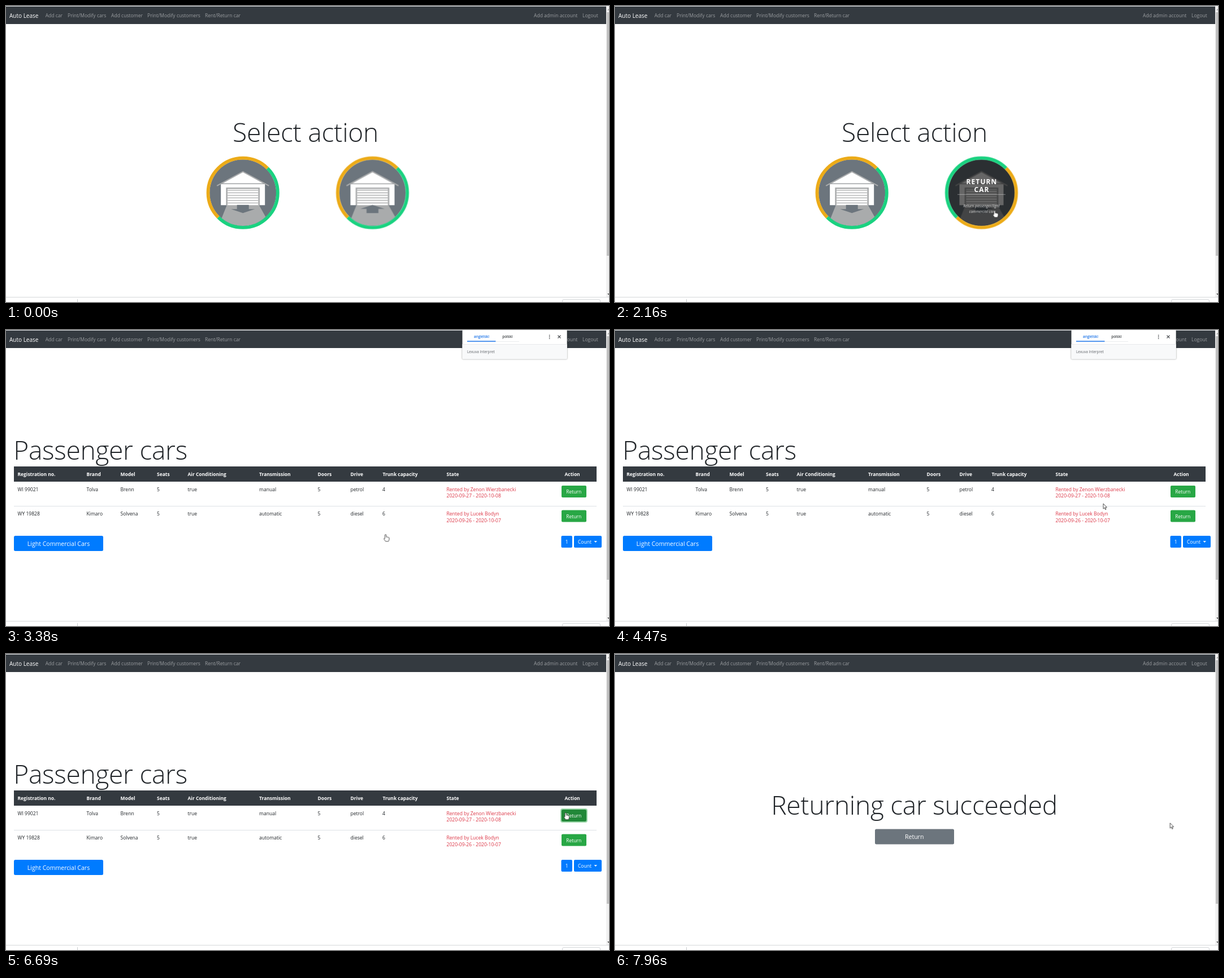
Write an HTML page that moves like this. It is 1067 px wide and 525 px high and loops after 8 s.

```html
<!DOCTYPE html>
<html lang="en">
<head>
<meta charset="utf-8">
<title>Auto Lease</title>
<style>
html, body { margin: 0; width: 100%; height: 100%; overflow: hidden; background: #fff; }
svg { display: block; width: 100%; height: 100%; }
text { font: 8.55px "Open Sans", "Noto Sans", sans-serif; fill: #212529; white-space: pre; }
.nav { fill: #9a9da0; }
.brand { font-size: 10px; fill: #fff; }
.title { font-size: 46.2px; font-weight: 300; letter-spacing: -.35px; }
.mid { text-anchor: middle; }
.head text { font-weight: 700; font-size: 8.45px; fill: #fff; }
.red text { fill: #dc3545; }
.btn text { fill: #fff; text-anchor: middle; }
.btn .big { font-size: 10.55px; }
.over text { text-anchor: middle; fill: #dcdcdc; font-size: 6.5px; font-style: italic; }
.over .cap { fill: #fff; font: 700 12px "Open Sans", "Noto Sans", sans-serif; letter-spacing: 1.1px; }
.url text { font-size: 6.37px; fill: #55585c; }
.popup text { font-size: 6.4px; font-weight: 600; fill: #3c4043; }
.popup .on { fill: #1a73e8; }
.popup .by { font-weight: 400; fill: #5f6368; }
.popup { filter: drop-shadow(0 .5px 1px rgba(0,0,0,.45)); }

.p1, .p2, .p3, .url, .popup, .spin, .over, .hot, .focus, .cursor, .arrow, .hand {
  animation: 8s linear infinite;
}
.p1 { animation-name: p1; animation-timing-function: step-end; }
.p2 { animation-name: p2; animation-timing-function: step-end; }
.p3 { animation-name: p3; animation-timing-function: step-end; }
.arrow { animation-name: arrow; animation-timing-function: step-end; }
.hand { animation-name: hand; animation-timing-function: step-end; }
.url { animation-name: url; }
.popup { animation-name: popup; }
.spin { animation-name: spin; animation-timing-function: ease-in-out; }
.over { animation-name: over; animation-timing-function: ease-in-out; }
.hot { animation-name: hot; }
.focus { animation-name: focus; }
.cursor { animation-name: move; }

@keyframes p1 { 0% { opacity: 1 } 37.5%, 100% { opacity: 0 } }
@keyframes p2 { 0% { opacity: 0 } 37.5% { opacity: 1 } 84.25%, 100% { opacity: 0 } }
@keyframes p3 { 0% { opacity: 0 } 84.25%, 100% { opacity: 1 } }
@keyframes url { 0%, 27% { opacity: 0 } 29.25%, 38.75% { opacity: 1 } 40.6%, 100% { opacity: 0 } }
@keyframes popup { 0%, 40.2% { opacity: 0 } 42.25%, 77.8% { opacity: 1 } 79.75%, 100% { opacity: 0 } }
@keyframes spin { 0%, 16.4% { transform: rotate(0deg) } 26.4%, 100% { transform: rotate(180deg) } }
@keyframes over { 0%, 16.4% { opacity: 0 } 26.4%, 100% { opacity: 1 } }
@keyframes hot { 0%, 64.1% { fill: #28a745 } 66%, 100% { fill: #218838 } }
@keyframes focus { 0%, 77.8% { opacity: 0 } 79.75%, 100% { opacity: 1 } }
@keyframes arrow {
  0% { opacity: 0 } 6.1% { opacity: 1 } 16.6% { opacity: 0 } 47.6% { opacity: 1 }
  64% { opacity: 0 } 90.7%, 100% { opacity: 1 }
}
@keyframes hand {
  0% { opacity: 0 } 16.6% { opacity: 1 } 47.6% { opacity: 0 }
  64% { opacity: 1 } 90.7%, 100% { opacity: 0 }
}
@keyframes move {
  0%, 6% { transform: translate(1043px, 524px) }
  15.875% { transform: translate(718px, 388px); animation-timing-function: ease-out }
  21%, 47.3% { transform: translate(671.6px, 362.4px); animation-timing-function: ease-in }
  50% { transform: translate(694px, 356px) }
  57.1% { transform: translate(899px, 298px) }
  64% { transform: translate(984px, 283px); animation-timing-function: ease-out }
  66.3%, 93.4% { transform: translate(990.2px, 281.2px); animation-timing-function: ease-in-out }
  99.5%, 100% { transform: translate(982.2px, 299.7px) }
}
</style>
</head>
<body>
<svg viewBox="0 0 1067 525" preserveAspectRatio="none">
  <defs>
    <clipPath id="disc"><circle r="58.6"/></clipPath>
    <g id="garage">
      <circle r="59" fill="#6c757d"/>
      <g clip-path="url(#disc)">
        <path d="M-28 21H28L42 46V60H-46L-38 46Z" fill="#a9abac"/>
        <path d="M-39 22V-15L0 -37 39 -15V22Z" fill="#fff"/>
        <path d="M-46 -12.500L0 -37.500 46 -12.500" fill="none" stroke="#a9abac" stroke-width="2"/>
        <path d="M-39 -16H39" stroke="#a0a3a5" stroke-width="1.500"/>
        <path d="M-28.500 22V-8H28.500V22" fill="none" stroke="#a9abac" stroke-width="2.600"/>
        <path d="M-27 -4.500H27M-27 0H27M-27 4.500H27M-27 9H27M-27 13.500H27M-27 18H27" stroke="#a9abac" stroke-width="1.300"/>
      </g>
    </g>
    <g id="ring" fill="none" stroke-width="5.800">
      <path d="M43.600 -43.600A61.650 61.650 0 0 0 -43.600 43.600" stroke="#ecab18"/>
      <path d="M43.600 -43.600A61.650 61.650 0 0 1 -43.600 43.600" stroke="#1ad280"/>
    </g>
  </defs>

  <rect width="1067" height="525" fill="#fff"/>

  <g class="p1">
    <text class="title mid" x="530" y="240.500">Select action</text>
    <g transform="translate(419.200 331.300)">
      <use href="#garage"/>
      <path d="M-10.500 21.500H10.500V29H21L0 36 -21 29H-10.500Z" fill="#6c757d"/>
      <use href="#ring"/>
    </g>
    <g transform="translate(648.500 331.300)">
      <use href="#garage"/>
      <path d="M-10.500 36H10.500V28.500H21.500L0 21.500 -21.500 28.500H-10.500Z" fill="#6c757d"/>
      <g class="over">
        <circle r="59" fill="#000" fill-opacity=".6"/>
        <text class="cap" x=".5" y="-15.500">RETURN</text>
        <text class="cap" x=".5" y="-1">CAR</text>
        <path d="M-42.500 3H42.500" stroke="#fff" stroke-opacity=".5" stroke-width=".8"/>
        <text y="25.300">Return passenger/light</text>
        <text x="1.500" y="35.300">commercial cars</text>
      </g>
      <g class="spin"><use href="#ring"/></g>
    </g>
  </g>

  <g class="p2">
    <text class="title" x="13.300" y="230">Passenger cars</text>
    <rect x="14" y="242" width="1031" height="27" fill="#343a40"/>
    <g class="head">
      <text x="20.500" y="259">Registration no.</text>
      <text x="142.500" y="259">Brand</text>
      <text x="202.500" y="259">Model</text>
      <text x="267" y="259">Seats</text>
      <text x="321.500" y="259">Air Conditioning</text>
      <text x="448" y="259">Transmission</text>
      <text x="551.500" y="259">Doors</text>
      <text x="609.500" y="259">Drive</text>
      <text x="666.500" y="259">Trunk capacity</text>
      <text x="779.500" y="259">State</text>
      <text x="988.500" y="259">Action</text>
    </g>
    <path d="M14 312.500H1045" stroke="#dee2e6"/>
    <g>
      <text x="20.500" y="285.500">WI 99021</text>
      <text x="142.500" y="285.500">Tolva</text>
      <text x="202.500" y="285.500">Brenn</text>
      <text x="267" y="285.500">5</text>
      <text x="321.500" y="285.500">true</text>
      <text x="448" y="285.500">manual</text>
      <text x="551.500" y="285.500">5</text>
      <text x="609.500" y="285.500">petrol</text>
      <text x="666" y="285.500">4</text>
    </g>
    <g>
      <text x="20.500" y="329">WY 19828</text>
      <text x="142.500" y="329">Kimaro</text>
      <text x="202.500" y="329">Solvena</text>
      <text x="267" y="329">5</text>
      <text x="321.500" y="329">true</text>
      <text x="448" y="329">automatic</text>
      <text x="551.500" y="329">5</text>
      <text x="609.500" y="329">diesel</text>
      <text x="666" y="329">6</text>
    </g>
    <g class="red">
      <text x="779.500" y="285.500">Rented by Zenon Wierzbanecki</text>
      <text x="779.500" y="297.300">2020-09-27 - 2020-10-08</text>
      <text x="779.500" y="329">Rented by Lucek Bodyn</text>
      <text x="779.500" y="340.800">2020-09-26 - 2020-10-07</text>
    </g>
    <g class="btn">
      <rect class="focus" x="982" y="275" width="46" height="23" rx="3" fill="none" stroke="#48b461" stroke-opacity=".55" stroke-width="2"/>
      <rect class="hot" x="983" y="276" width="44" height="21" rx="2" fill="#28a745"/>
      <text x="1004.700" y="290">Return</text>
      <rect x="983" y="319.500" width="44" height="21" rx="2" fill="#28a745"/>
      <text x="1004.700" y="333.500">Return</text>
      <g fill="#007bff">
        <rect x="14" y="365" width="158" height="27" rx="2.500"/>
        <rect x="982.500" y="365" width="19.500" height="21" rx="2"/>
        <rect x="1005" y="365" width="49" height="21" rx="2"/>
      </g>
      <text class="big" x="93" y="382.700">Light Commercial Cars</text>
      <text x="992.300" y="379">1</text>
      <text x="1024" y="379">Count</text>
      <path d="M1040.500 374.200H1046L1043.250 377Z" fill="#fff"/>
    </g>
  </g>

  <g class="p3">
    <text class="title mid" x="529.500" y="284.500">Returning car succeeded</text>
    <g class="btn">
      <rect x="460" y="310.500" width="140" height="27" rx="2.500" fill="#6c757d"/>
      <text class="big" x="529.700" y="328.300">Return</text>
    </g>
  </g>

  <g>
    <rect width="1062" height="1" fill="#e3e5e8"/>
    <rect y="1" width="1062" height="31" fill="#343a40"/>
    <text class="brand" x="6" y="20.700">Auto Lease</text>
    <text class="nav" x="69.700" y="20">Add car</text>
    <text class="nav" x="109" y="20">Print/Modify cars</text>
    <text class="nav" x="186" y="20">Add customer</text>
    <text class="nav" x="250" y="20">Print/Modify customers</text>
    <text class="nav" x="352" y="20">Rent/Return car</text>
    <text class="nav" x="934" y="20">Add admin account</text>
    <text class="nav" x="1020" y="20">Logout</text>
  </g>

  <g>
    <rect x="1062" width="5" height="516" fill="#f1f1f1"/>
    <rect x="1063" y="11" width="4" height="432" fill="#c1c1c1"/>
    <path d="M1064 7.500L1066.500 5 1067 5.500V7.500Z" fill="#a3a3a3"/>
    <path d="M1064 510H1067V512L1066.500 512.500Z" fill="#505050"/>
    <rect y="516" width="1067" height="9" fill="#fff"/>
    <path d="M0 516.500H1067" stroke="#d5d7da"/>
    <path d="M126.500 520V525" stroke="#c9cbce"/>
    <path d="M984.500 525V523Q984.500 520.500 987 520.500H1049Q1051.500 520.500 1051.500 523V525" fill="none" stroke="#d5d7da"/>
  </g>

  <g class="url">
    <path d="M0 503.500H324.500Q326.500 503.500 326.500 505.500V516H0Z" fill="#dee1e6"/>
    <text x="0" y="512.700">carrentalapplication-env-2.eba-h3uprfbz.eu-central-1.elasticbeanstalk.com/printCars?controllerAction=return</text>
  </g>

  <g class="popup">
    <path d="M807.500 0H992.700V50Q992.700 51.500 991 51.500H809Q807.500 51.500 807.500 50Z" fill="#fff"/>
    <path d="M807.500 25.500H992.700V50Q992.700 51.500 991 51.500H809Q807.500 51.500 807.500 50Z" fill="#f8f9fa"/>
    <path d="M807.500 25.500H992.700M866.500 20.500H908" stroke="#e4e6e9" stroke-width=".8"/>
    <path d="M816 20H866.500" stroke="#1a73e8" stroke-width="1.300"/>
    <text class="on mid" x="841.500" y="14">angielski</text>
    <text class="mid" x="887.300" y="14">polski</text>
    <text class="by" x="816" y="40.700">Lexuva Interpret</text>
    <g fill="#4a4d51">
      <circle cx="961.700" cy="9.300" r=".9"/>
      <circle cx="961.700" cy="12.200" r=".9"/>
      <circle cx="961.700" cy="15.100" r=".9"/>
    </g>
    <path d="M976.500 9.500L981.500 14.500M981.500 9.500L976.500 14.500" stroke="#4a4d51" stroke-width="1.100"/>
  </g>

  <g class="cursor" fill="#fff" stroke="#222" stroke-width=".8" stroke-linejoin="round">
    <path class="arrow" d="M0 0V9.200L2.100 7.200 3.600 10.600 5 10 3.600 6.700H6.400Z"/>
    <path class="hand" d="M-1.200 1Q0 -.8 1.200 1V4.600Q5 4.800 6.400 6V9Q6 11 5 12.500H0L-2.800 8.400Q-3.200 6.400 -1.200 7.400Z"/>
  </g>
</svg>
</body>
</html>
```
